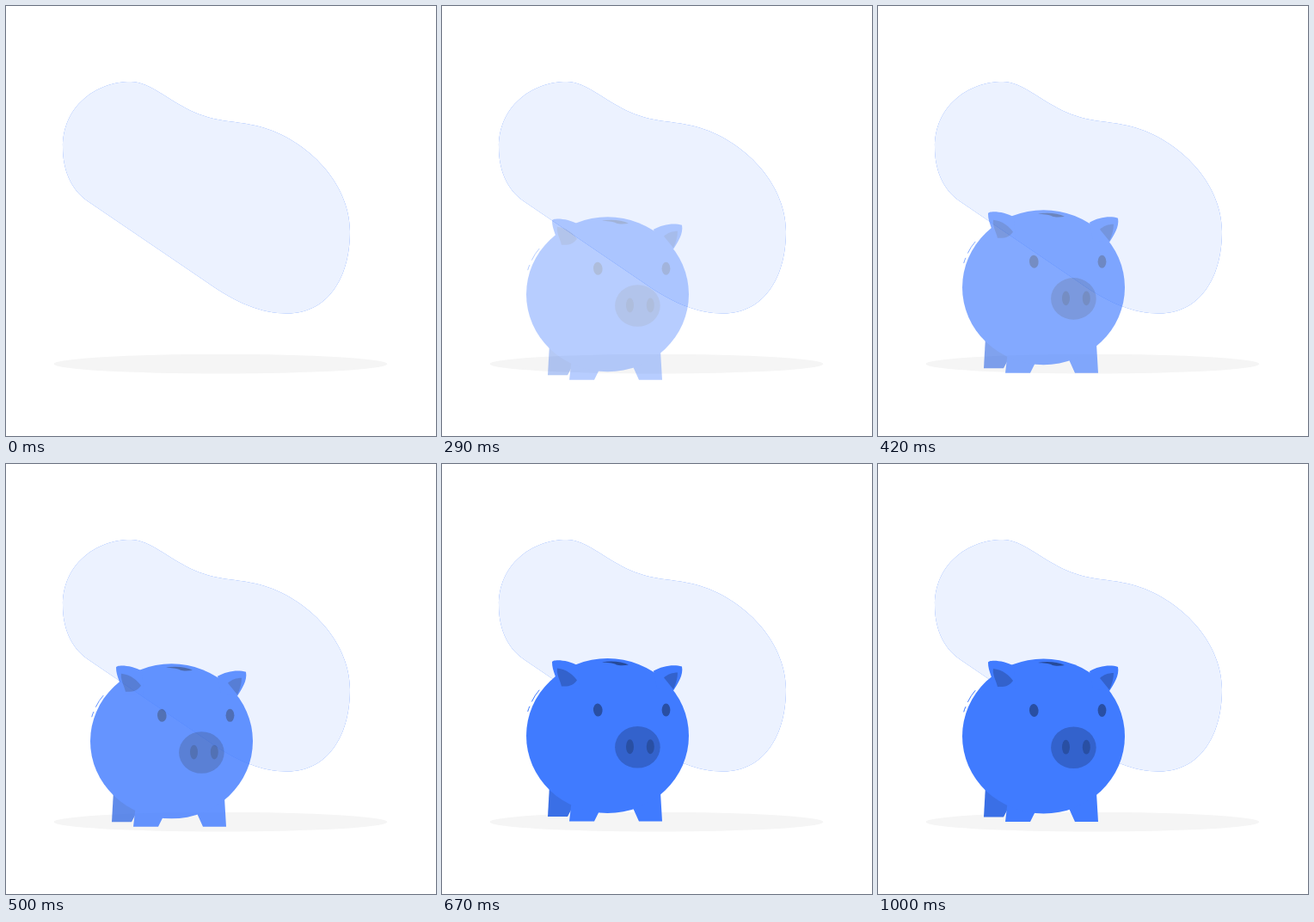
An HTML page that plays this animation: 500x500 px, repeating every 1.04 s.

```html
<!DOCTYPE html>
<html lang="en">
<head>
<meta charset="utf-8">
<title>Piggy bank</title>
<style>
  html, body { margin: 0; width: 100%; height: 100%; overflow: hidden; background: #fff; }
  svg { display: block; width: 100%; height: 100%; }
  .main { fill: #407bff; }
  .back { fill: #3a6fe6; }
  .shade { fill: #3362cc; }
  .dark { fill: #294fa3; }
  .slot { fill: #264a99; }
  .line { fill: none; stroke: #407bff; stroke-linecap: round; }
</style>
</head>
<body>
<svg viewBox="0 0 500 500">
  <defs>
    <path id="blob" d="M145 88C168 88 190 111 220 124C247 135 262 133 290 139C345 151 400 203 400 262C400 318 373 357.5 327 357.5C297 357.5 267 345 234 321.500L95 227C75 213 66 190 66 164C66 117 104 88 145 88Z"/>
  </defs>
  <use href="#blob" fill="#407bff"/>
  <use href="#blob" fill="#fff" opacity=".9"/>
  <ellipse cx="249.500" cy="416.200" rx="193.900" ry="11.300" fill="#f5f5f5"/>

  <g id="pig" opacity="0">
    <path class="back" d="M125 374L123 410.500H146L150 403L156 390Z"/>
    <path class="main" d="M151 390L148 416H177L183 404V390ZM220 396L229 416H256L254 382Z"/>
    <ellipse class="main" cx="192.500" cy="316.500" rx="94.500" ry="90"/>
    <!-- ears -->
    <path class="main" d="M128 231C128 227 147 228 158 235L160 262L136 262C134 250 128 241 128 231Z"/>
    <path class="main" d="M246 241C256 235 270 233 279 236C281 246 274 256 269 264L250 262Z"/>
    <path class="shade" d="M134 238C145 239 153 246 157 252C152 259 147 259 139 259C137 251 133 245 134 238Z"/>
    <path class="shade" d="M258 249C262 245 268 243 274 243C274 250 272 256 269 262.500Z"/>
    <!-- coin slot -->
    <path class="slot" d="M186 231C196 229 209 230 217 234C212 235 206 235 203 234C198 231 192 232 186 231Z"/>
    <!-- face -->
    <ellipse class="dark" cx="181.300" cy="286.500" rx="5.300" ry="7.500" transform="rotate(-5 181.300 286.500)"/>
    <ellipse class="dark" cx="260.500" cy="286.500" rx="4.900" ry="7.500"/>
    <ellipse class="shade" cx="227.400" cy="329.700" rx="26.300" ry="24.300"/>
    <ellipse class="dark" cx="218.500" cy="329.200" rx="4.500" ry="8.400"/>
    <ellipse class="dark" cx="242.300" cy="329.200" rx="4.500" ry="8.400"/>
    <!-- highlights -->
    <path class="line" d="M113 263.500Q108 269 104.500 276.500M101.800 282.500Q100.500 285 99.800 288"/>
  </g>
</svg>
<script>
  const LOOP = 1040, STEP = 1000 / 24, LEAD = 33, RISE = 30;
  const pig = document.getElementById('pig');

  const bezier = (a, b, s) => 3 * (1 - s) ** 2 * s * a + 3 * (1 - s) * s * s * b + s ** 3;

  // Overshooting ease: cubic-bezier(.36, -.01, .5, 1.38)
  function ease(x) {
    if (x >= 1) return 1;
    let lo = 0, hi = 1;
    for (let i = 0; i < 30; i++) {
      const mid = (lo + hi) / 2;
      if (bezier(.36, .5, mid) < x) lo = mid; else hi = mid;
    }
    return bezier(-.01, 1.38, lo);
  }

  function draw(now) {
    // Movement runs at 24 steps a second; the pig stays hidden for the first three.
    const step = Math.floor((now % LOOP + 5) / STEP);
    const p = step < 3 ? 0 : ease((step * STEP + LEAD) / 1000);
    pig.setAttribute('opacity', Math.min(1, p));
    pig.setAttribute('transform', `translate(0 ${RISE * (1 - p)})`);
  }

  const start = performance.now();
  function tick() {
    draw(performance.now() - start);
    requestAnimationFrame(tick);
  }
  tick();
</script>
</body>
</html>
```
